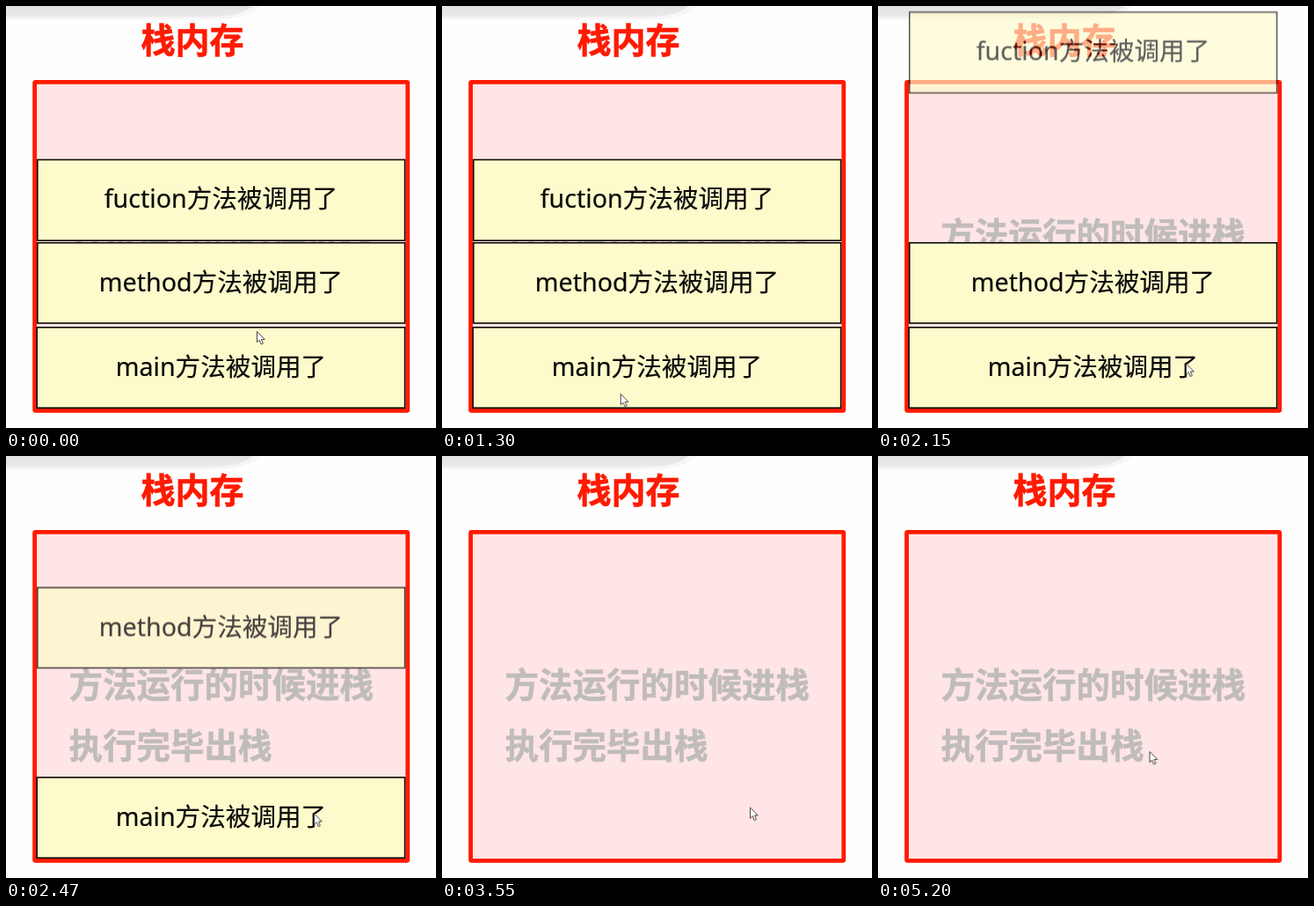
Recreate the animation shown at these times as an HTML page. Size 489 px wide and 479 px high, loop 5.3 s.

```html
<!DOCTYPE html>
<html lang="zh-CN">
<head>
<meta charset="utf-8">
<title>栈内存</title>
<style>
  html, body { margin: 0; width: 100%; height: 100%; overflow: hidden; background: #fefefe; }
  svg { display: block; width: 489px; height: 479px; }
  text { font-family: "Noto Sans", "Noto Sans CJK SC", "Noto Sans CJK", sans-serif; text-anchor: middle; }

  .title, .note { font-weight: 700; stroke-width: .6; }
  .title { font-size: 39px; fill: #ff1a00; stroke: #ff1a00; }
  .note { font-size: 38.5px; fill: #c0bcbb; stroke: #c0bcbb; text-anchor: start; }
  .call rect { fill: #fdfacb; stroke: #0c0a08; stroke-width: 1.6; }
  .call text { font-size: 28.6px; fill: #0a0a0a; stroke: #0a0a0a; stroke-width: .2; }

  .call, .cursor { animation: 5300ms linear infinite; }
  .first { animation-name: pop-first; }
  .second { animation-name: pop-second; }
  .third { animation-name: pop-third; }
  .cursor { animation-name: point; }

  /* Each call rises 490px and fades over 320 ms. */
  @keyframes pop-first {
    0%, 38.52% { transform: none; opacity: 1; }
    44.56%, 100% { transform: translateY(-490px); opacity: 0; }
  }
  @keyframes pop-second {
    0%, 45.15% { transform: none; opacity: 1; }
    51.19%, 100% { transform: translateY(-490px); opacity: 0; }
  }
  @keyframes pop-third {
    0%, 50.02% { transform: none; opacity: 1; }
    56.06%, 100% { transform: translateY(-490px); opacity: 0; }
  }
  @keyframes point {
    0%, 0.4% { transform: translate(285px, 369px); }
    3.77% { transform: translate(300px, 318px); }
    7.55% { transform: translate(165px, 461px); }
    10.38%, 24.53% { transform: translate(202px, 440px); }
    28.11%, 57.36% { transform: translate(350px, 405.5px); }
    59.06%, 92.83% { transform: translate(350px, 398.5px); }
    98.11%, 100% { transform: translate(308.5px, 335px); }
  }
</style>
</head>
<body>
<svg viewBox="0 0 489 479">
  <defs>
    <linearGradient id="shade" x2="0" y2="1">
      <stop offset="0" stop-color="#e2e2e2"/>
      <stop offset="1" stop-color="#ebebeb"/>
    </linearGradient>
  </defs>

  <path d="M0 0H289Q276 15.5 232 15.5H0Z" fill="#f6f6f6"/>
  <path d="M0 0H280Q268 12.5 226 12.5H0Z" fill="url(#shade)"/>

  <text class="title" x="212" y="53.3">栈内存</text>
  <rect x="32.6" y="86.3" width="424.2" height="373" rx="1" fill="#ffe5e5" stroke="#ff1a00" stroke-width="4.8"/>
  <text class="note" x="71.5" y="274.3">方法运行的时候进栈</text>
  <text class="note" x="71.5" y="342.8">执行完毕出栈</text>

  <g class="call third">
    <rect x="35.2" y="364.8" width="418.4" height="91.4"/>
    <text x="244.5" y="419.8">main方法被调用了</text>
  </g>
  <g class="call second">
    <rect x="35.8" y="268.8" width="417.8" height="91.2"/>
    <text x="244.5" y="323.5">method方法被调用了</text>
  </g>
  <g class="call first">
    <rect x="35.8" y="174.5" width="417.8" height="91.7"/>
    <text x="244.5" y="229.2">fuction方法被调用了</text>
  </g>

  <g class="cursor">
    <path d="M.5 .5V12.8L3.2 10.2L5.2 15L7.4 14L5.4 9.4H9.2Z" fill="#fff" stroke="#4a4444" stroke-width="1"/>
  </g>
</svg>
</body>
</html>
```
